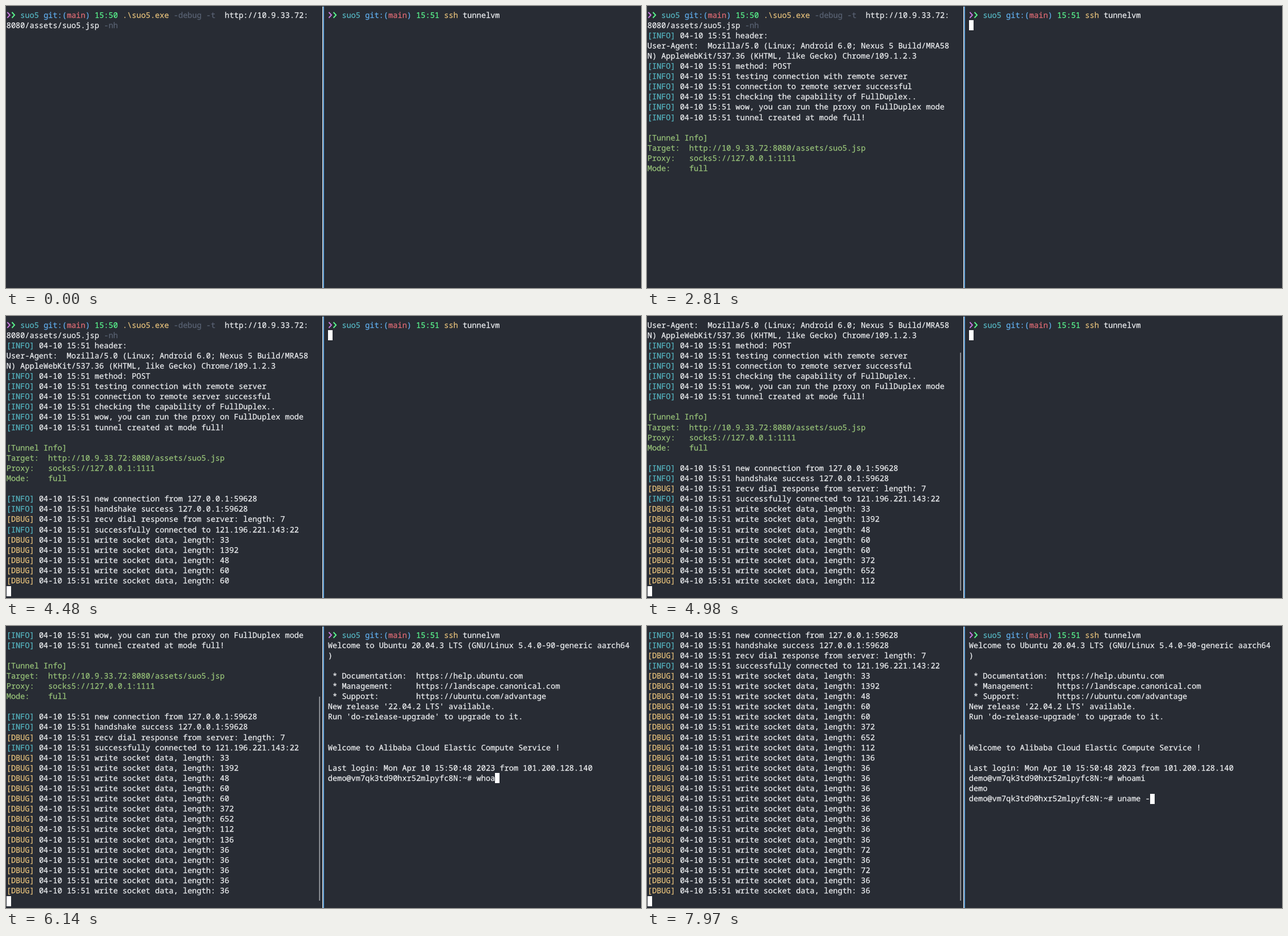
Recreate the animation shown at these times as an HTML page. Size 1122 by 499 pixels, loop 8000 ms.

```html
<!DOCTYPE html>
<html lang="en">
<head>
<meta charset="utf-8">
<title>Tunnel session</title>
<style>
  html, body { margin: 0; width: 100%; height: 100%; overflow: hidden; background: #282c34; }
  svg { display: block; width: 1122px; height: 499px; }
  text {
    font: 13.68px "Noto Sans Mono", "DejaVu Sans Mono", monospace;
    font-variant-ligatures: none;
    text-rendering: geometricPrecision;
    white-space: pre;
    stroke-width: .25;
  }
  .chevron { fill: none; stroke-width: 1.9; }
</style>
</head>
<body>
<svg viewBox="0 0 1122 499">
  <rect width="1122" height="499" fill="#282c34"/>
  <g id="left"></g>
  <rect id="bar" x="553.2" width="1.6" fill="#a0a3a8"/>
  <rect id="edgeLeft" x="559" y="1" width="1.5" height="498"/>
  <rect id="edgeRight" x="560.5" y="1" width="1.5" height="498"/>
  <g id="right"></g>
</svg>
<script>
const LOOP = 8000, CELL = 8.21, ROW = 18.1, TOP = 7, ROWS = 27, LAG = 160;
const TRACK = { end: 486, length: 468 };
const C = {
  fg: '#eef0f2', cyan: '#56b6c2', blue: '#61afef', red: '#e06c75', green: '#98c379',
  lime: '#5af78e', yellow: '#e5c07b', purple: '#c678dd', dim: '#5a6374',
  cursor: '#ffffff', edge: '#f2f2f2', accent: '#4a9be0'
};
const $ = id => document.getElementById(id);

// A line is a list of [text, color] runs.
const plain = text => [[text, C.fg]];
const tunnel = text => [[text, C.green]];
const log = (tag, color) => text => [[`[${tag}]`, color], [` 04-10 15:51 ${text}`, C.fg]];
const info = log('INFO', C.cyan), debug = log('DBUG', C.yellow);
const prompt = (time, ...runs) => Object.assign([
  ['   ', C.fg], ['suo5 ', C.cyan], ['git:(', C.blue], ['main', C.red], [') ', C.blue],
  [time + ' ', C.lime], ...runs
], { chevrons: true });

const sizes = [33, 1392, 48, 60, 60, 372, 652, 112, 136, ...Array(8).fill(36), 72, 36, 72, 36, 36];
const leftLines = [
  prompt('15:50', ['.\\suo5.exe', C.yellow], [' -debug -t', C.dim], ['  http://10.9.33.72:', C.fg]),
  [['8080/assets/suo5.jsp', C.fg], [' -nh', C.dim]],
  info('header:'),
  plain('User-Agent:  Mozilla/5.0 (Linux; Android 6.0; Nexus 5 Build/MRA58'),
  plain('N) AppleWebKit/537.36 (KHTML, like Gecko) Chrome/109.1.2.3'),
  info('method: POST'),
  info('testing connection with remote server'),
  info('connection to remote server successful'),
  info('checking the capability of FullDuplex..'),
  info('wow, you can run the proxy on FullDuplex mode'),
  info('tunnel created at mode full!'),
  plain(''),
  tunnel('[Tunnel Info]'),
  tunnel('Target:  http://10.9.33.72:8080/assets/suo5.jsp'),
  tunnel('Proxy:   socks5://127.0.0.1:1111'),
  tunnel('Mode:    full'),
  plain(''),
  info('new connection from 127.0.0.1:59628'),
  info('handshake success 127.0.0.1:59628'),
  debug('recv dial response from server: length: 7'),
  info('successfully connected to 121.196.221.143:22'),
  ...sizes.map(n => debug(`write socket data, length: ${n}`))
];

const USER = 'demo';
const shell = `${USER}@vm7qk3td90hxr52mlpyfc8N:~# `;
const sshLine = prompt('15:51', ['ssh ', C.yellow], ['tunnelvm', C.fg]);
const banner = [
  'Welcome to Ubuntu 20.04.3 LTS (GNU/Linux 5.4.0-90-generic aarch64',
  ')',
  '',
  ' * Documentation:  https://help.ubuntu.com',
  ' * Management:     https://landscape.canonical.com',
  ' * Support:        https://ubuntu.com/advantage',
  "New release '22.04.2 LTS' available.",
  "Run 'do-release-upgrade' to upgrade to it.",
  '',
  '',
  'Welcome to Alibaba Cloud Elastic Compute Service !',
  '',
  'Last login: Mon Apr 10 15:50:48 2023 from 101.200.128.140'
];
const first = typed => [...banner, shell + typed];
const second = typed => [...first('whoami'), USER, shell + typed];

// Each step overrides part of the state before it.
const steps = [];
const at = (time, change) => steps.push({ ...steps.at(-1), time, ...change });
at(0, { lines: 2, cursor: null, focus: 'right', output: null });
at(170, { focus: 'left', cursor: 'prompt' });
at(1000, { cursor: 'next' });
at(1160, { lines: 7 });
at(1330, { lines: 9 });
at(1660, { lines: 17, cursor: null });
at(2150, { focus: 'right', output: [] });
at(2810, { output: [''] });
at(2970, { lines: 19, cursor: 'next' });
at(3300, { lines: 21 });
at(3470, { lines: 23 });
at(3630, { lines: 24 });
at(4310, { lines: 25 });
at(4480, { lines: 26 });
at(4640, { lines: 27 });
at(4810, { lines: 29 });
at(5140, { lines: 31, output: first('') });
at(5810, { lines: 32, output: first('w') });
at(5980, { lines: 34, output: first('who') });
at(6140, { lines: 35, output: first('whoa') });
at(6310, { lines: 37, output: first('whoami') });
at(6480, { lines: 38 });
at(7310, { output: second('') });
at(7470, { lines: 39, output: second('un') });
at(7640, { lines: 40, output: second('una') });
at(7810, { lines: 42, output: second('uname ') });
at(7970, { lines: 43, output: second('uname -') });

const stateAt = time => steps.findLast(s => s.time <= Math.max(0, time));
const scrollOf = state => Math.max(0, state.lines + 1 - ROWS);
const escapeText = s => s.replace(/&/g, '&amp;').replace(/</g, '&lt;');
const lineLength = line => line.reduce((n, [text]) => n + text.length, 0);

function drawLine(line, row, x) {
  let col = 0;
  const runs = line.map(([text, color]) => {
    const left = (x + col * CELL).toFixed(2);
    col += text.length;
    return `<tspan x="${left}" fill="${color}" stroke="${color}">${escapeText(text)}</tspan>`;
  }).join('');
  const y = TOP + row * ROW;
  const chevron = (i, color) =>
    `<path class="chevron" stroke="${color}" d="M${x + 1.6 + i * CELL} ${y + 4}l4.6 5l-4.6 5"/>`;
  const marks = line.chevrons ? chevron(0, C.purple) + chevron(1, C.lime) : '';
  return `${marks}<text y="${Math.round(y + 13.5)}">${runs}</text>`;
}

const drawCursor = (col, row, x) =>
  `<rect x="${Math.round(x + col * CELL)}" y="${Math.round(TOP + row * ROW)}" width="8" height="18" fill="${C.cursor}"/>`;

function drawLeft(state) {
  const x = 0.7, scroll = scrollOf(state);
  let html = leftLines.slice(scroll, state.lines).map((l, i) => drawLine(l, i, x)).join('');
  if (state.cursor === 'prompt') html += drawCursor(lineLength(leftLines[1]), 1, x);
  if (state.cursor === 'next') html += drawCursor(0, state.lines - scroll, x);
  $('left').innerHTML = html;
}

function drawRight(state) {
  const x = 568.8;
  const lines = [sshLine, ...(state.output || []).map(plain)];
  let html = lines.map((l, i) => drawLine(l, i, x)).join('');
  if (state.output) html += drawCursor(lineLength(lines.at(-1)), lines.length - 1, x);
  $('right').innerHTML = html;
}

function drawEdges(state) {
  const onLeft = state.focus === 'left';
  $('edgeLeft').setAttribute('fill', onLeft ? C.accent : C.edge);
  $('edgeRight').setAttribute('fill', onLeft ? C.edge : C.accent);
}

// The scroll bar follows the text a moment later.
function drawBar(scroll) {
  const height = scroll ? TRACK.length * ROWS / (ROWS + scroll) : 0;
  $('bar').setAttribute('y', TRACK.end - height);
  $('bar').setAttribute('height', height);
}

let shown;
const start = performance.now();
function frame() {
  const time = (performance.now() - start) % LOOP;
  const state = stateAt(time);
  if (state !== shown) {
    drawLeft(state);
    drawRight(state);
    drawEdges(state);
    shown = state;
  }
  drawBar(scrollOf(state) && scrollOf(stateAt(time - LAG)));
  requestAnimationFrame(frame);
}
frame();
</script>
</body>
</html>
```
